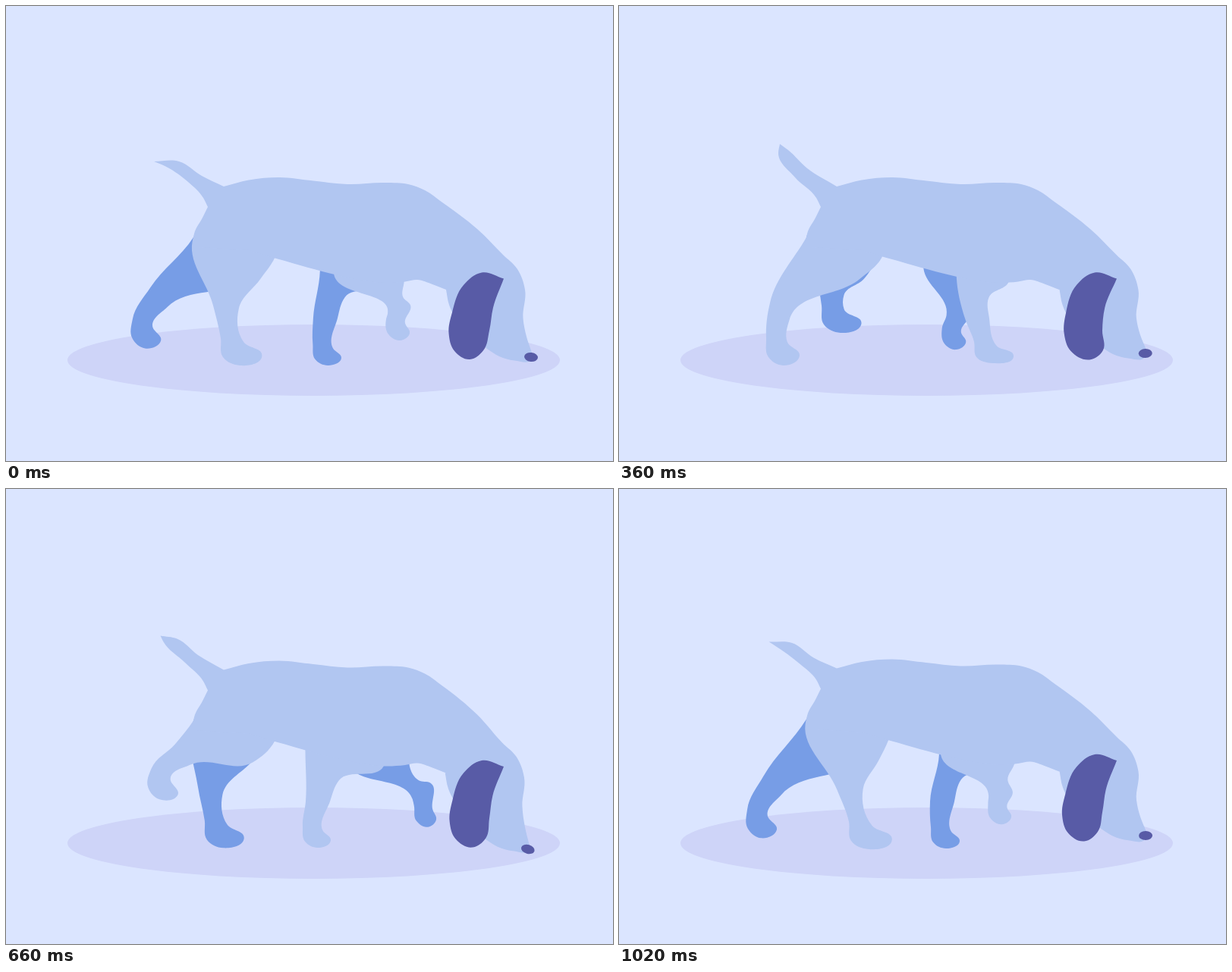
Animation, 800 px wide and 600 px high, one loop 1.04 s. Source, as an HTML page with a canvas:

```html
<!DOCTYPE html>
<html lang="en">
<head>
<meta charset="utf-8">
<title>Sniffing dog</title>
<style>
html, body { margin: 0; width: 100%; height: 100%; overflow: hidden; background: #dbe5ff; }
canvas { display: block; }
</style>
</head>
<body>
<canvas id="stage" width="800" height="600"></canvas>
<script>
const ctx = document.getElementById('stage').getContext('2d');
const LOOP = 1040, STEP = 20;
const COAT = '#b1c6f1', SHADE = '#779de6', DARK = '#585ba6';

// One stride of the hind leg: phase, hock x y, ankle x y, paw turn.
const hindGait = [
  [0, 290, 397, 296, 442, 0],
  [220, 244, 399, 250, 441, 0],
  [360, 212, 402, 207, 442, 0],
  [485, 201, 386, 179, 421, .12],
  [640, 233, 350, 203, 376, .3],
  [725, 247, 343, 223, 371, .4],
  [855, 280, 377, 280, 399, 0],
  [900, 302, 386, 317, 432, 0],
  [955, 316, 395, 333, 444, 0]
];

// One stride of the front leg: phase, wrist x y, ankle x y, paw length.
const foreGait = [
  [0, 518, 400, 514, 417, 18],
  [110, 548, 398, 551, 421, 16],
  [220, 523, 415, 533, 436, 28],
  [360, 472, 412, 481, 447, 39],
  [480, 426, 412, 424, 450, 25],
  [640, 411, 412, 404, 449, 24],
  [725, 405, 408, 394, 445, 20],
  [855, 436, 408, 419, 432, 22],
  [900, 458, 408, 456, 427, 16]
];

// Phase, bob of the back, drop of the head, extra drop of the nose, lift of the tail.
const sniff = [
  [0, 0, 0, 0, 0],
  [220, 4, 5, 1, .6],
  [360, 0, 0, -5, 1],
  [480, -3, -2.5, -1.5, .45],
  [545, -1, .5, 0, 0],
  [640, .5, 6.5, 5.5, .5],
  [770, 4, 5.5, 1, 1],
  [900, -2.5, -3.5, -5.5, .45],
  [1000, -1.5, -1.5, -4.5, .15]
];

// Tip, upper edge, lower edge.
const tailLow = [195,205, 228,205, 258,224, 205,209, 240,232];
const tailHigh = [212,182, 223,190, 248,214, 210,194, 232,226];

const wave = (u, peak) => Math.cos((u - peak) / LOOP * Math.PI * 2);
const mix = (a, b, k) => a + (b - a) * k;

// Harmonic mean slope: smooth, with no overshoot.
const slope = (a, b) => a * b > 0 ? 2 * a * b / (a + b) : 0;

function sample(track, phase) {
  const u = phase % LOOP, n = track.length;
  const key = i => {
    const [t, ...v] = track[(i + n) % n];
    return { t: t + LOOP * Math.floor(i / n), v };
  };
  let i = n - 1;
  while (track[i][0] > u) i--;
  const [a, b, c, d] = [key(i - 1), key(i), key(i + 1), key(i + 2)];
  const h = c.t - b.t, s = (u - b.t) / h, r = 1 - s;
  return b.v.map((y, k) => {
    const m = (c.v[k] - y) / h;
    const m0 = slope((y - a.v[k]) / (b.t - a.t), m);
    const m1 = slope(m, (d.v[k] - c.v[k]) / (d.t - c.t));
    return y * (1 + 2 * s) * r * r + c.v[k] * s * s * (3 - 2 * s) + h * s * r * (m0 * r - m1 * s);
  });
}

function points(list, dx = 0, dy = 0) {
  const out = [];
  for (let i = 0; i < list.length; i += 2) out.push([list[i] + dx, list[i + 1] + dy]);
  return out;
}

// Unit tangent at b, leaning towards the nearer neighbour.
function tangent(a, b, c) {
  const p = Math.hypot(b[0] - a[0], b[1] - a[1]) || 1e-6;
  const q = Math.hypot(c[0] - b[0], c[1] - b[1]) || 1e-6;
  const x = (b[0] - a[0]) * q / p + (c[0] - b[0]) * p / q;
  const y = (b[1] - a[1]) * q / p + (c[1] - b[1]) * p / q;
  const l = Math.hypot(x, y) || 1;
  return [x / l, y / l];
}

// Smooth curve through the points, joined to the current path.
function curve(p) {
  const last = p.length - 1;
  const dir = p.map((b, i) => i && i < last ? tangent(p[i - 1], b, p[i + 1])
    : i ? tangent(p[i - 1], p[i - 1], b) : tangent(b, b, p[1]));
  ctx.lineTo(...p[0]);
  for (let i = 0; i < last; i++) {
    const [x, y] = p[i], [X, Y] = p[i + 1];
    const l = Math.hypot(X - x, Y - y) * .35;
    ctx.bezierCurveTo(x + dir[i][0] * l, y + dir[i][1] * l,
      X - dir[i + 1][0] * l, Y - dir[i + 1][1] * l, X, Y);
  }
}

function shape(color, ...curves) {
  ctx.fillStyle = color;
  ctx.beginPath();
  curves.forEach(curve);
  ctx.closePath();
  ctx.fill();
}

function oval(color, x, y, rx, ry, turn = 0) {
  ctx.fillStyle = color;
  ctx.beginPath();
  ctx.ellipse(x, y, rx, ry, turn, 0, Math.PI * 2);
  ctx.fill();
}

// Back of the ankle, heel, sole, toe and instep.
function paw(x, y, length, depth, turn) {
  const c = Math.cos(turn), s = Math.sin(turn);
  const local = [-13,-4, -10,depth * .66, length * .3,depth, length,depth * .6, 8 + length * .22,1];
  return points(local).map(([a, b]) => [x + a * c - b * s, y + a * s + b * c]);
}

function hindLeg(phase, groinX, bob, color) {
  const [hx, hy, ax, ay, turn] = sample(hindGait, phase);
  const across = Math.atan2(300 - hx, hy - 300);
  const wx = 17 * Math.cos(across), wy = 17 * Math.sin(across);
  const groin = [groinX, 332 + bob];
  const knee = [groinX - Math.min(29, .4 * Math.abs(groinX - hx - wx)), 360 + bob];
  shape(color, [[264, 275 + bob], [247, 305 + bob], [hx - wx, hy - wy],
    ...paw(ax, ay, 31 + (ax - 207) * .117, 32, turn),
    [hx + wx, hy + wy], knee, groin, [groinX + 8, 307 + bob]]);
}

function foreLeg(phase, bob, color) {
  const [wx, wy, ax, ay, length] = sample(foreGait, phase);
  const across = -Math.atan2(Math.max(0, wx - 495), wy - 340);
  const dx = 16 * Math.cos(across), dy = 16 * Math.sin(across);
  const backX = 423 + 34 * wave(phase, 215), chestX = 495 + (wx - 400) * .25;
  const backY = 331 + (backX - 347) * .265 + bob;
  shape(color, [[backX, backY - 20], [backX, backY], [wx - dx, wy - dy],
    ...paw(ax, ay, length, 24, 0),
    [wx + dx, wy + dy], [wx + dx + (470 - wx) * .2, 384 + bob * .5],
    [chestX, 365 + bob], [chestX + 5, 340]]);
}

function drawBody(bob, head, nose, dx, lift) {
  const [tip, top, topMid, low, lowMid] = points(tailLow.map((v, i) => mix(v, tailHigh[i], lift)));
  const snout = [693 + dx * .8, 457 + head + nose];
  shape(COAT,
    [tip, top, topMid, [287, 238 + bob]],
    [...points([287,238, 320,229.5, 360,226, 405,230.5, 450,235, 500,233, 530,235, 552,243, 575,259], 0, bob),
      [621, 294 + (bob + head) / 2],
      ...points([655,328, 674,347, 684,374, 681.5,412], dx * .25, head),
      [686 + dx * .5, 436 + head + nose * .5], snout],
    [snout, ...points([692,466, 670,467.5, 650,462, 634,452], dx * .5, head + nose * .6)],
    points([605,425, 590,407, 584,394, 580,374], dx * .3, bob),
    points([580,374, 562,367, 542,361, 526,363.5, 500,365, 470,362, 437,355, 358,333.5, 347,330.5], 0, bob),
    points([320,322, 252,318], 0, bob),
    points([246,311, 249,297, 258,281, 266,265], 0, bob),
    [[266, 265 + bob], [260, 253 + bob], lowMid, low, tip]);
}

function drawEar(head, sway) {
  const half = sway * .45;
  shape(DARK, points([656,359.5, 627,351.5, 603,368, 588 + half * .3,404, 583.5 + half * .8,432,
    591 + sway * .5,455, 611 + sway * 1.3,466, 629 + sway,454, 637,428, 642 - sway * .2,398, 656,359.5], 0, head));
}

function draw(ms) {
  const t = Math.floor(ms % LOOP / STEP) * STEP;
  const u = t <= 520 ? t : t - STEP;
  const [bob, head, nose, lift] = sample(sniff, u);
  const dx = -.35 * (head + nose);
  const sway = 11 * Math.sin((u - 25) / 520 * Math.PI) ** 2;
  const groinX = 352 + 6 * wave(u, 840);

  ctx.fillStyle = '#dbe5ff';
  ctx.fillRect(0, 0, 800, 600);
  oval('#ced4f8', 405.5, 467, 324.5, 47);
  hindLeg(u + 495, groinX - 6, bob, SHADE);
  foreLeg(u + 520, bob, SHADE);
  hindLeg(u, groinX, bob, COAT);
  foreLeg(u, bob, COAT);
  drawBody(bob, head, nose, dx, lift);
  drawEar(head, sway);
  oval(DARK, 692 + dx, 463 + head + nose, 9, 6, .12 + nose * .03);
}

const start = performance.now();
function tick(now) {
  draw(Math.max(0, now - start));
  requestAnimationFrame(tick);
}
draw(0);
requestAnimationFrame(tick);
</script>
</body>
</html>
```
